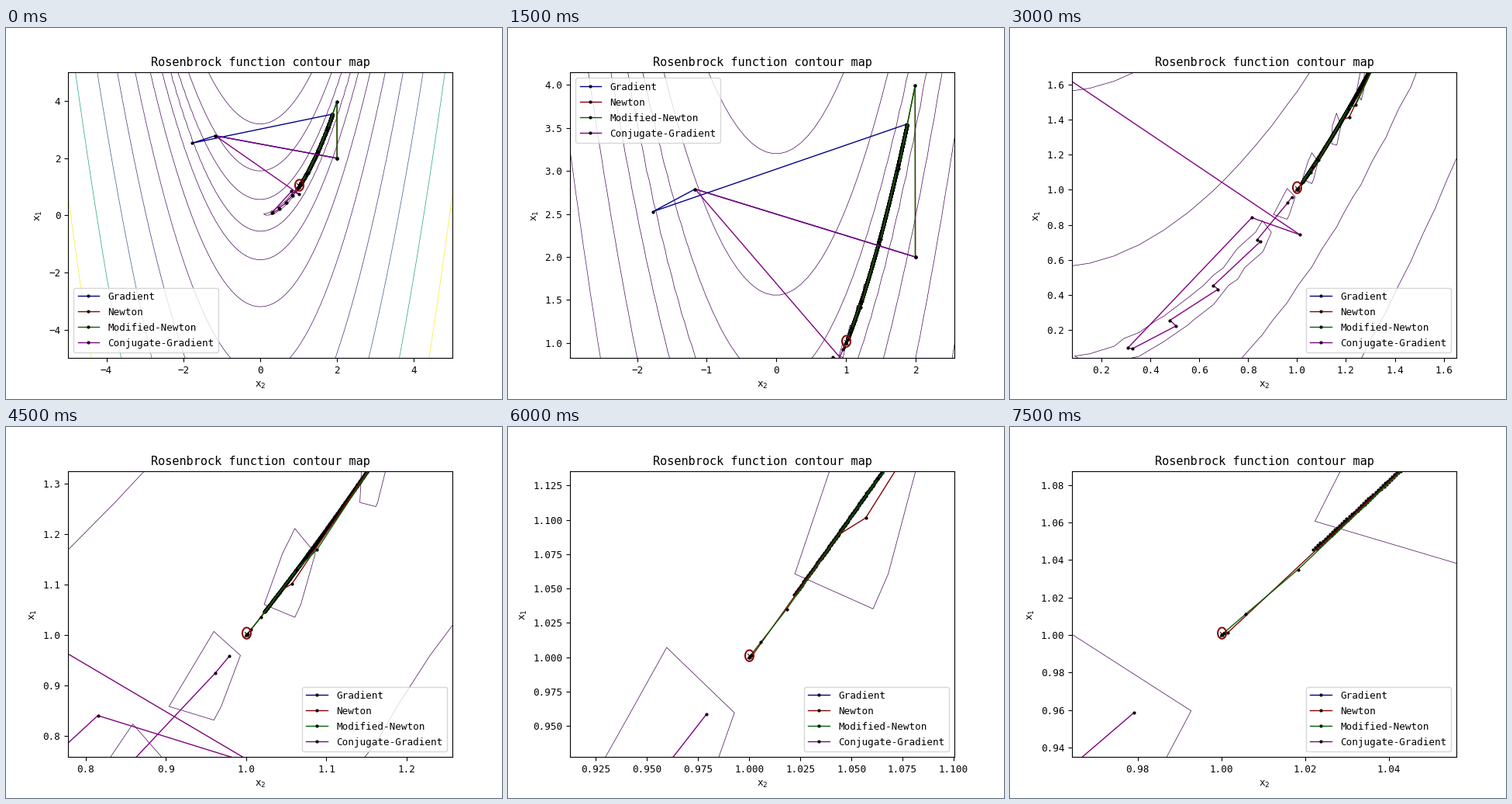
These frames come from a looping animation (640 px wide and 478 px high, 8 s). A matplotlib script:

```python
import numpy as np
import matplotlib.pyplot as plt
from matplotlib.animation import FuncAnimation

plt.rcParams.update({"font.family": "DejaVu Sans Mono", "font.size": 9.13})

STEP_MS = 500
HOLD = 3      # animation steps per view
STEPS = 16

# Zoom boxes: xmin, xmax, ymin, ymax, legend corner
VIEWS = [
    (-5, 5, -5, 5, "lower left"),
    (-2.968, 2.5625, 0.825, 4.141, "upper left"),
    (0.0795, 1.652, 0.0386, 1.669, "lower right"),
    (0.7778, 1.257, 0.758, 1.324, "lower right"),
    (0.9123, 1.1004, 0.9273, 1.1351, "lower right"),
    (0.9643, 1.0561, 0.9349, 1.0871, "lower right"),
]

START = (2, 2)
FIRST = (-1.168, 2.788)   # steepest-descent step from START


def rosenbrock(x, y):
    return 100 * (y - x**2) ** 2 + (1 - x) ** 2


def gradient_path():
    """Two wide swings, then a fine zigzag along the valley floor."""
    head = [START, FIRST, (-1.776, 2.526), (1.871, 3.54)]
    x = np.linspace(1.88, 1.0225, 3000)
    side = 0.0003 * (-1) ** np.arange(x.size)
    return np.vstack([head, np.column_stack([x - 0.0003 + side, x**2])])


def newton_path(turn, jumps, tail):
    """Even hops down to x = turn; each leaves the floor on its tangent."""
    floor = np.linspace(1.9975, turn, 4)
    hops = [*zip(floor, floor[1:] + 0.03), *jumps]
    pts = [START]
    for a, b in hops:
        pts += [(a, a * a), (b, a * a + 2 * a * (b - a))]
    return np.array(pts + tail)


def conjugate_path():
    """A wide swing, then crossings that narrow towards the minimum."""
    pts = [START, FIRST, (1.012, 0.743), (0.815, 0.8405),
           (0.308, 0.097), (0.327, 0.093)]
    for k in range(3):
        right, left = 0.505 + 0.172 * k, 0.48 + 0.178 * k
        pts += [(right, right**2 - 0.046 * np.sqrt(1 - right)),
                (left, left**2 + 0.034 * np.sqrt(1 - left))]
    return np.array(pts + [(0.9613, 0.9246), (0.9791, 0.9586)])


paths = [
    ("Gradient", "darkblue", gradient_path()),
    ("Newton", "darkred", newton_path(
        1.183, [(1.183, 1.057), (1.0435, 1.0015)], [(1, 1)])),
    ("Modified-Newton", "darkgreen", newton_path(
        1.21, [(1.21, 1.088), (1.063, 1.0183)],
        [(1.0057, 1.011), (1.0005, 1.001), (1, 1)])),
    ("Conjugate-Gradient", "purple", conjugate_path()),
]

fig, ax = plt.subplots(figsize=(6.4, 4.78), dpi=100)
grid = np.linspace(-5, 5, 100)
X, Y = np.meshgrid(grid, grid)
ax.contour(X, Y, rosenbrock(X, Y), levels=np.arange(1, 10) ** 5,
           linewidths=0.5)

for name, color, pts in paths:
    ax.plot(*pts.T, color=color, lw=1, marker="o", ms=2, mfc="black",
            mec="black", label=name)

# Ring around the minimum, raised a little above it
angle = np.linspace(0, 2 * np.pi, 41)
ring = np.column_stack([0.76 * np.cos(angle), np.sin(angle) + 0.4])
ax.plot(1, 1, marker=ring, ms=14.5, mfc="none", mec="darkred", mew=1.44)
ax.annotate("x", (1, 1), xytext=(0, 0.7), textcoords="offset points",
            ha="center", va="center")

ax.set_title("Rosenbrock function contour map")
ax.set_xlabel("x$_2$")
ax.set_ylabel("x$_1$")


def update(i):
    x0, x1, y0, y1, corner = VIEWS[i // HOLD]
    ax.set_xlim(x0, x1)
    ax.set_ylim(y0, y1)
    legend = ax.legend(loc=corner, fontsize=10)
    for text in legend.get_texts():
        text.set_fontsize(9.13)
    return []


anim = FuncAnimation(fig, update, frames=STEPS, interval=STEP_MS,
                     repeat=True, repeat_delay=0)
plt.show()
```
